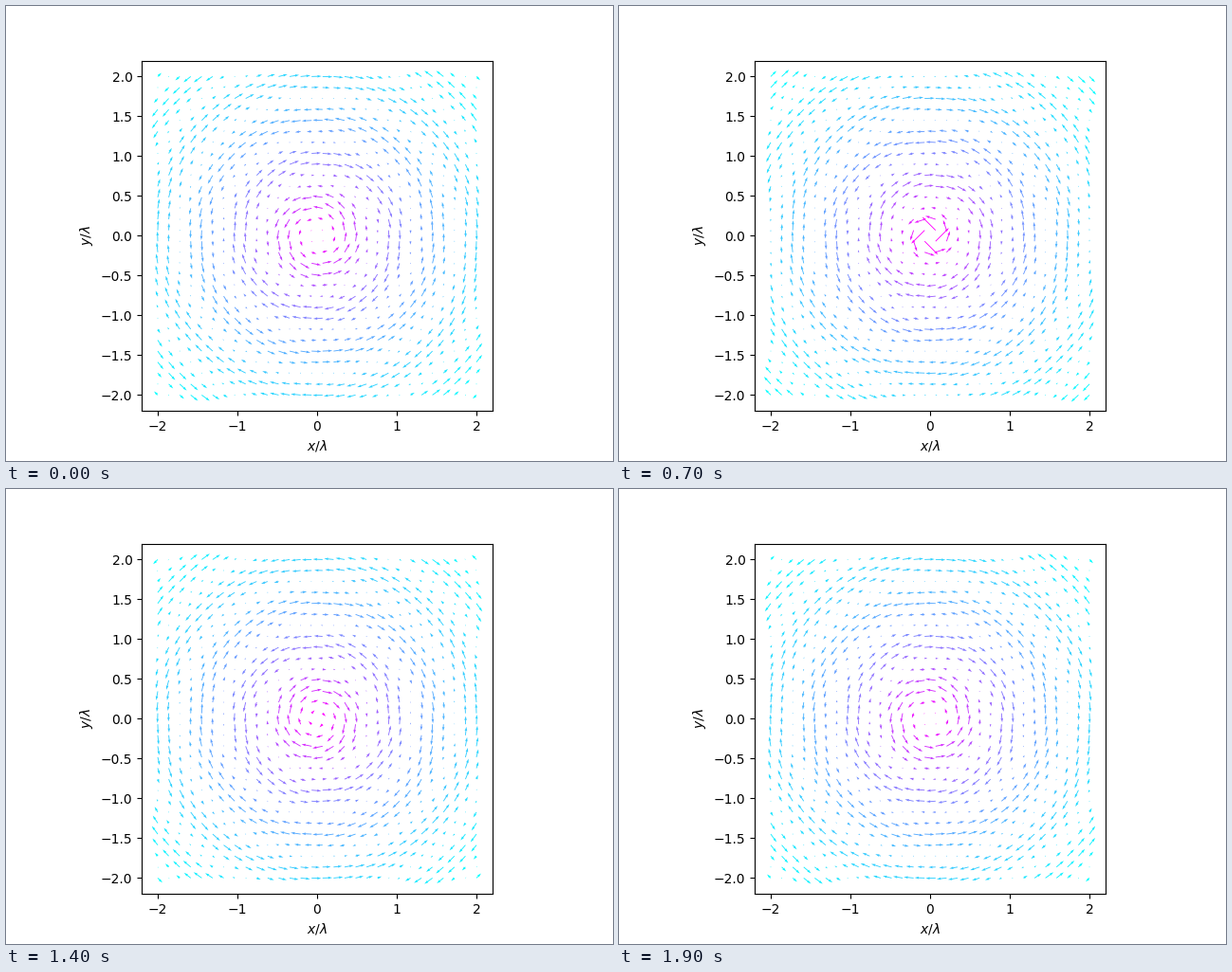
A matplotlib script for the animation above (2000 ms loop, 640 px wide and 480 px high).

```python
import numpy as np
import matplotlib.pyplot as plt
from matplotlib.animation import FuncAnimation

FRAMES = 20
PERIODS = 2

axis = np.linspace(-2, 2, 30)
X, Y = np.meshgrid(axis, axis)
R = np.hypot(X, Y)
KR = 2 * np.pi * R


def field(i):
    """Azimuthal dipole field times r, as clockwise vectors."""
    phase = KR - 2 * np.pi * PERIODS * i / (FRAMES - 1)
    f = np.cos(phase) - np.sin(phase) / KR
    return f * Y / R, -f * X / R


fig, ax = plt.subplots(figsize=(6.4, 4.8), dpi=100)
ax.set_aspect("equal")
ax.set_xlabel(r"$x/\lambda$")
ax.set_ylabel(r"$y/\lambda$")
arrows = ax.quiver(X, Y, *field(0), np.exp(-R / 2), cmap="cool")
ax.set_xlim(-2.2, 2.2)
ax.set_ylim(-2.2, 2.2)


def update(i):
    arrows.set_UVC(*field(i))
    return (arrows,)


anim = FuncAnimation(fig, update, frames=FRAMES, interval=100,
                     repeat=True, repeat_delay=0)
plt.show()
```
